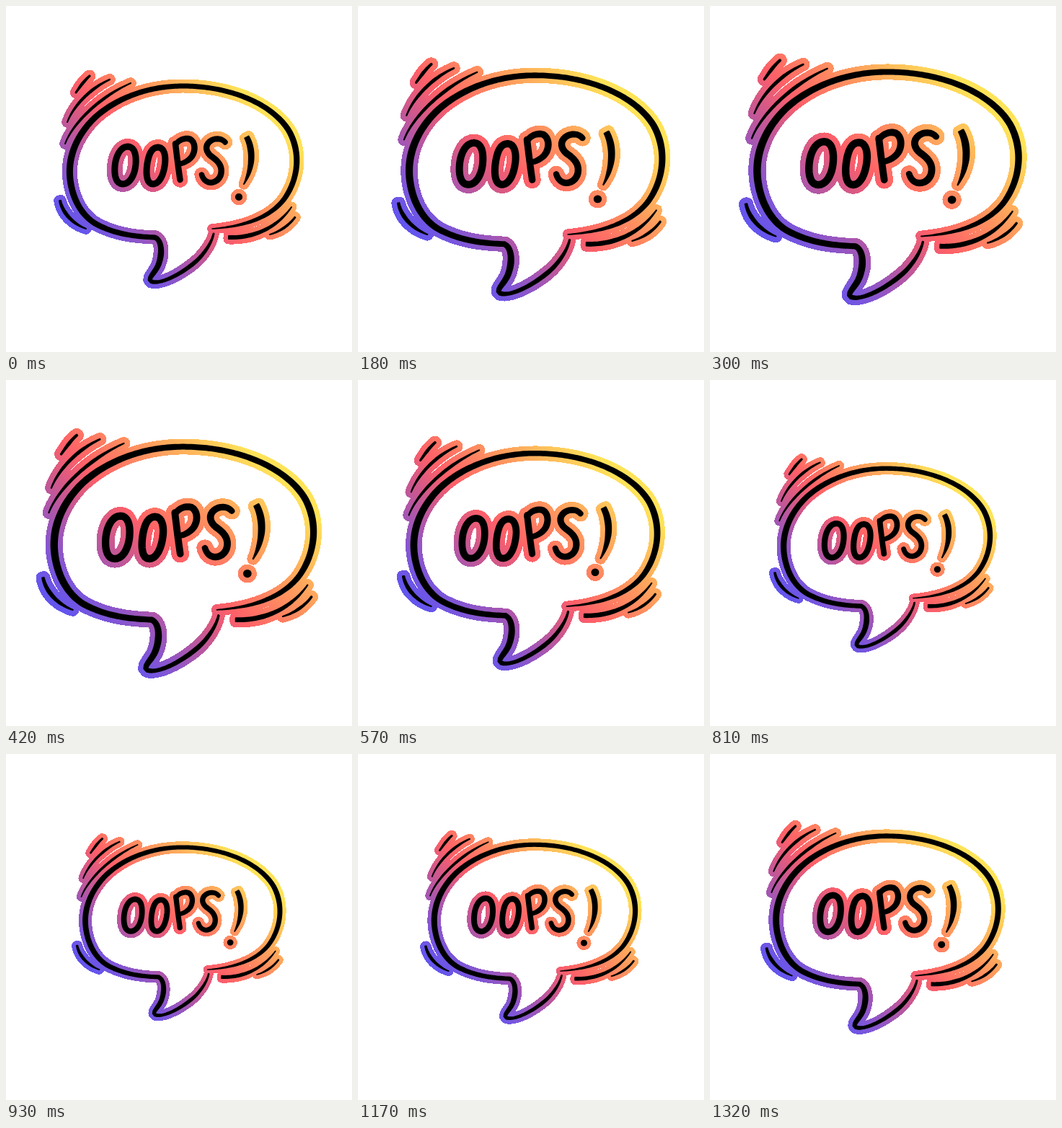
These frames come from a looping animation (480 px wide and 480 px high, 1350 ms). An HTML page:

```html
<!DOCTYPE html>
<html lang="en">
<head>
<meta charset="utf-8">
<title>Oops!</title>
<style>
  html, body { margin: 0; width: 100%; height: 100%; overflow: hidden; background: #fff; }
  svg { display: block; width: 100vw; height: 100vh; }
  path { stroke-linejoin: round; stroke-linecap: round; }
  #halo { shape-rendering: crispEdges; }
</style>
</head>
<body>
<svg viewBox="0 0 480 480" role="img" aria-label="OOPS!">
  <defs>
    <linearGradient id="glow" gradientUnits="userSpaceOnUse" x1="135" y1="345" x2="345" y2="135">
      <stop offset="0" stop-color="#6455ee"/>
      <stop offset=".1" stop-color="#7c56da"/>
      <stop offset=".2" stop-color="#9b56bc"/>
      <stop offset=".35" stop-color="#cf588c"/>
      <stop offset=".48" stop-color="#ff6068"/>
      <stop offset=".7" stop-color="#ff965e"/>
      <stop offset="1" stop-color="#ffe358"/>
    </linearGradient>
  </defs>
  <g id="bubble">
    <g id="halo" fill="url(#glow)" stroke="url(#glow)"></g>
    <g id="ink" fill="#000" stroke="#000"></g>
  </g>
</svg>
<script>
const NS = "http://www.w3.org/2000/svg";
const PERIOD = 1350, STEP = 30, SWING = 0.154;
const $ = id => document.getElementById(id);

// Each stroke: centre line, widths spread evenly along it, halo margin
const strokes = [
  // bubble and tail
  ["M286 309 C330 306 365 294 385 269 C405 242 410 205 393 174 C371 137 313 111 245 111 C190 111 145 133 120 158 C95 184 84 215 90 247 C95 275 110 296 130 305 C155 317 180 320 207 321",
    [1.6, 5.5, 7.5, 8.5, 7.5, 7, 7, 7.5, 8.5, 9.2, 8.8, 7.5, 7], 6],
  ["M207 321 C217 326 217 345 211 360 C206 371 196 378 201 382 C215 388 250 368 268 350 C280 337 286 325 288 316",
    [7, 8.5, 7.5, 5, 5.5, 6, 5, 3], 6.3],
  // shake lines
  ["M97 120 C102 113 108 104 116 97", [3, 4.5, 3.5], 6.8],
  ["M85 161 C94 138 117 114 144 102", [2, 4, 4.5, 2.5], 6.8],
  ["M82 191 C92 164 128 127 173 107", [2, 4, 4.5, 2], 6.8],
  ["M75 270 C78 286 92 302 111 309", [4, 5.5, 4.5, 2], 6.8],
  ["M309 321 C342 322 375 309 396 279", [6, 6, 4.5, 2], 6.5],
  ["M366 317 C380 313 393 304 401 293", [2, 4, 3], 6.5],
  // O O P S
  ["M169 195 C178 195 181 206 180 219 C179 234 172 247 162 247 C153 247 150 236 151 223 C152 208 159 195 169 195 Z", [9], 6.5],
  ["M211 196 C219 196 222 207 220.500 219 C218.500 236 212 247 204 247 C196 247 194 236 195.500 222 C197.500 206 202 196 211 196 Z", [9], 6.5],
  ["M235 191 C237 208 239 224 241.500 241", [8.5], 6.5],
  ["M235 193 C238 187 247 182 255 184.500 C264 189 263 204 256 211 C252 215 247 218 241 219", [7.5, 8.5, 8.5, 7], 6.5],
  ["M304 189 C299 183 290 183 284 187 C275 193 277 203 285.500 209 C294 215 301 222 298 234 C294 247 276 250 271.500 234", [7.5, 8.5, 8.5, 8.5, 7.5], 6.5],
  // !
  ["M334 182 C342 197 344 222 330 247", [8, 9, 8.5, 6, 2], 6.5],
  ["M322.800 265 L323.200 265", [9.8], 6.3]
];

function widthAt(ws, u) {
  const p = u * (ws.length - 1), i = Math.min(Math.floor(p), ws.length - 2);
  return ws.length < 2 ? ws[0] : ws[i] + (ws[i + 1] - ws[i]) * (p - i);
}

// Outline of a brush stroke; its thinnest width is left to the rounded pen
function brush(d, ws, pen) {
  const line = document.createElementNS(NS, "path");
  line.setAttribute("d", d);
  const len = line.getTotalLength(), n = Math.max(2, Math.ceil(len / 3));
  const left = [], right = [];
  for (let i = 0; i <= n; i++) {
    const s = len * i / n;
    const p = line.getPointAtLength(s);
    const a = line.getPointAtLength(Math.max(0, s - 0.5));
    const b = line.getPointAtLength(Math.min(len, s + 0.5));
    const m = Math.hypot(b.x - a.x, b.y - a.y) || 1;
    const h = (widthAt(ws, i / n) - pen) / 2;
    const nx = (a.y - b.y) / m * h, ny = (b.x - a.x) / m * h;
    left.push((p.x + nx).toFixed(2) + " " + (p.y + ny).toFixed(2));
    right.unshift((p.x - nx).toFixed(2) + " " + (p.y - ny).toFixed(2));
  }
  return "M" + left.concat(right).join("L") + "Z";
}

function add(id, d, width) {
  const el = document.createElementNS(NS, "path");
  el.setAttribute("d", d);
  el.setAttribute("stroke-width", width);
  $(id).appendChild(el);
}

function build() {
  for (const [d, ws, margin] of strokes) {
    const pen = Math.min(...ws);
    const shape = brush(d, ws, pen);
    add("halo", shape, pen + 2 * margin);
    add("ink", shape, pen);
  }
}

function draw(ms) {
  const t = Math.floor((ms % PERIOD) / STEP) * STEP;
  const k = 1 + SWING * Math.sin(2 * Math.PI * t / PERIOD);
  $("bubble").setAttribute("transform", `translate(240 240) scale(${k.toFixed(5)}) translate(-240 -240)`);
}

function tick() {
  draw(performance.now());
  requestAnimationFrame(tick);
}

build();
tick();
</script>
</body>
</html>
```
